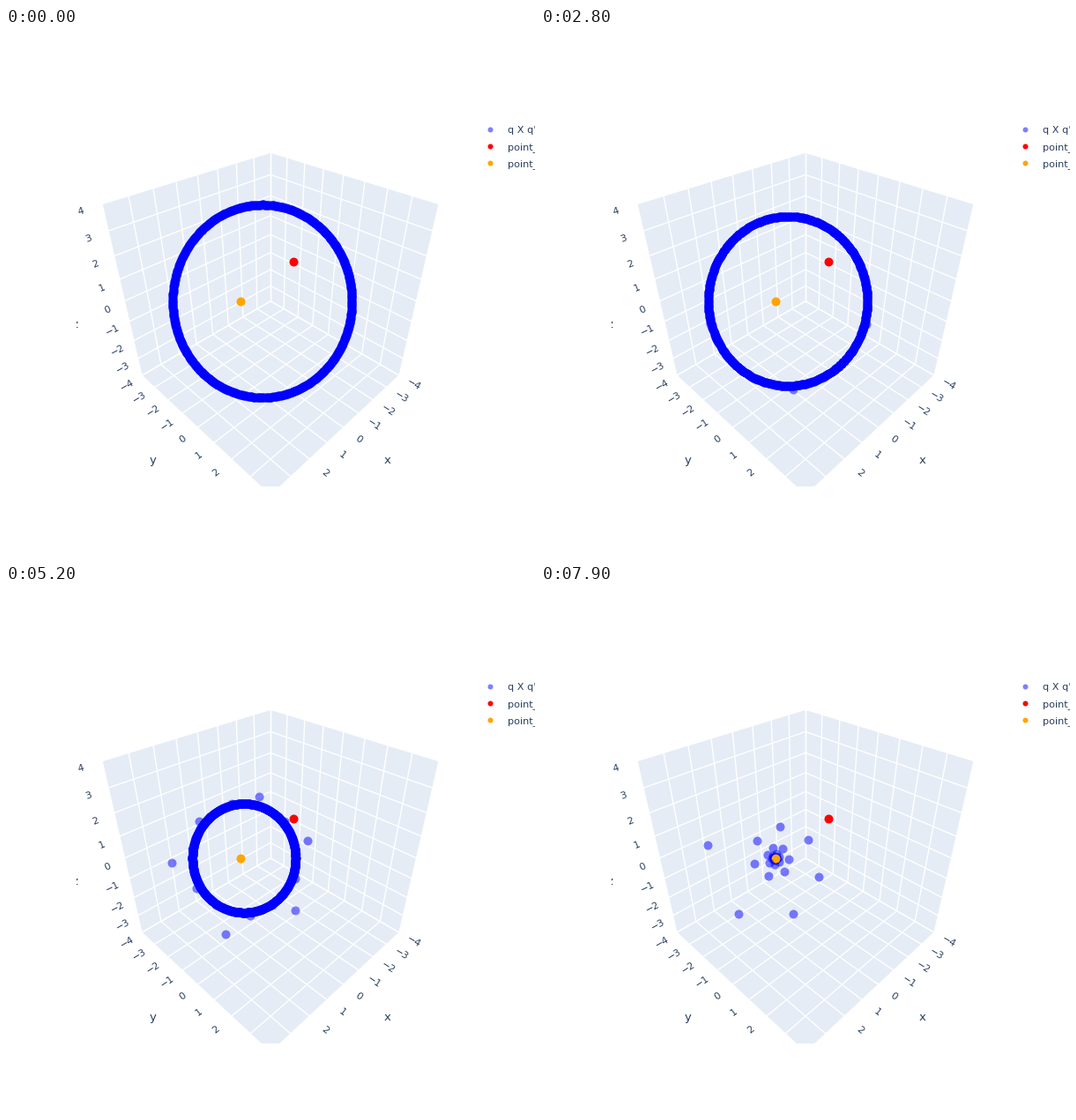
A matplotlib script for the animation above (8000 ms loop, 600 by 600 pixels).

```python
import numpy as np
import matplotlib.pyplot as plt
from matplotlib.animation import FuncAnimation

SIZE, DPI = 600, 100
FRAMES, STEP_MS = 80, 100
N_POINTS = 1000
INK, WALL = "#2a3f5f", "#E5ECF6"
BLUE, RED, ORANGE = "#0000ff", "#ff0000", "#ffa500"
FONT = "DejaVu Sans"

START = np.array([1.0, 2.0, 3.0])
POLE = np.array([-1.0, -3.0, -2.0])
RADIUS = np.sqrt(14)

# Camera on the (1, 1, 1) diagonal; data units span -4..4
RIGHT = np.array([-1, 1, 0]) / np.sqrt(2)
UP = np.array([-1, -1, 2]) / np.sqrt(6)
TOWARD = np.array([1, 1, 1]) / np.sqrt(3)
EYE = 8 * 1.25 * np.sqrt(3)
FOCAL = 507
CENTER = (300, 309.8)


def px(n):
    """Pixels to points."""
    return n * 72 / DPI


def project(p):
    p = np.asarray(p, float)
    scale = FOCAL / (EYE - p @ TOWARD)
    return np.stack([CENTER[0] + (p @ RIGHT) * scale,
                     CENTER[1] - (p @ UP) * scale], axis=-1)


def orbit(c):
    """Each point is the apex over the previous one and the pole."""
    x, t = START / RADIUS, POLE / RADIUS
    tx, ty, tz = t
    a, b, d = x
    pts = np.empty((N_POINTS, 3))
    for i in range(N_POINTS):
        a, b, d = (c * (a + tx) + b * tz - d * ty,
                   c * (b + ty) + d * tx - a * tz,
                   c * (d + tz) + a * ty - b * tx)
        n = (a * a + b * b + d * d) ** 0.5
        a, b, d = a / n, b / n, d / n
        pts[i] = a, b, d
    return pts * RADIUS


def make_axes(x0, y0, x1, y1):
    ax = fig.add_axes([x0 / SIZE, 1 - y1 / SIZE,
                       (x1 - x0) / SIZE, (y1 - y0) / SIZE])
    ax.set_xlim(x0, x1)
    ax.set_ylim(y1, y0)
    ax.axis("off")
    return ax


def draw_walls(ax):
    for fixed in range(3):
        u, v = [k for k in range(3) if k != fixed]

        def at(a, b):
            p = [-4.0] * 3
            p[u], p[v] = a, b
            return p

        corners = project([at(-4, -4), at(4, -4), at(4, 4), at(-4, 4)])
        ax.fill(*corners.T, color=WALL, lw=0, zorder=1)
        for g in range(-4, 5):
            for ends in ([at(g, -4), at(g, 4)], [at(-4, g), at(4, g)]):
                ax.plot(*project(ends).T, color="white", lw=px(1.4), zorder=2)


def label(ax, text, pos, angle=0, size=11.3):
    ax.text(*pos, text, rotation=angle, rotation_mode="anchor",
            ha="center", va="center_baseline", fontsize=px(size),
            family=FONT, color=INK, clip_on=True, zorder=3)


def draw_ticks(ax, axis, out, base, values):
    """Tick labels run along the outward direction of their axis."""
    for v in values:
        p = np.array(base, float)
        p[axis] = v
        p[out] = 4.74
        q = p.copy()
        q[out] = 4.0
        pos = project(p)
        dx, dy = project(q) - pos
        if dx < 0:
            dx, dy = -dx, -dy
        text = str(v).replace("-", "\u2212")
        label(ax, text, pos, np.degrees(np.arctan2(-dy, dx)))


def dots(ax, color, z, at=None, alpha=1.0, size=10):
    xy = np.empty((0, 2)) if at is None else np.atleast_2d(at)
    return ax.scatter(xy[:, 0], xy[:, 1], s=px(size) ** 2, c=color,
                      alpha=alpha, linewidths=0, zorder=z)


fig = plt.figure(figsize=(SIZE / DPI, SIZE / DPI), dpi=DPI, facecolor="white")
stage = make_axes(0, 0, SIZE, SIZE)
scene = make_axes(80, 80, 520, 520)

draw_walls(scene)
draw_ticks(scene, 2, 0, (4, -4, 0), range(-3, 5))
draw_ticks(scene, 1, 0, (4, 0, -4), range(-4, 3))
draw_ticks(scene, 0, 1, (0, 4, -4), range(-4, 3))
for name, p in (("x", (0, 6, -4)), ("y", (6, 0, -4)), ("z", (6, -4, 0))):
    label(scene, name, project(p), size=13.2)

legend = (("q X q'", BLUE, 0.5), ("point_", RED, 1), ("point_", ORANGE, 1))
for i, (text, color, alpha) in enumerate(legend):
    y = 114.5 + 19 * i
    dots(stage, color, 3, (549, y), alpha, 6)
    stage.text(568.6, y + 4.3, text, fontsize=px(11.3), family=FONT,
               color=INK, va="baseline", clip_on=True)

behind = dots(scene, BLUE, 4, alpha=0.5)
dots(scene, ORANGE, 5, project(POLE))
front = dots(scene, BLUE, 6, alpha=0.5)
dots(scene, RED, 7, project(START))


def update(n):
    pts = orbit(0.024 + 0.00875 * n)
    near = (pts - POLE) @ TOWARD > 0.06
    xy = project(pts)
    behind.set_offsets(xy[~near])
    front.set_offsets(xy[near])
    return behind, front


anim = FuncAnimation(fig, update, frames=FRAMES, interval=STEP_MS,
                     init_func=lambda: update(0), repeat=True, repeat_delay=0)
plt.show()
```
